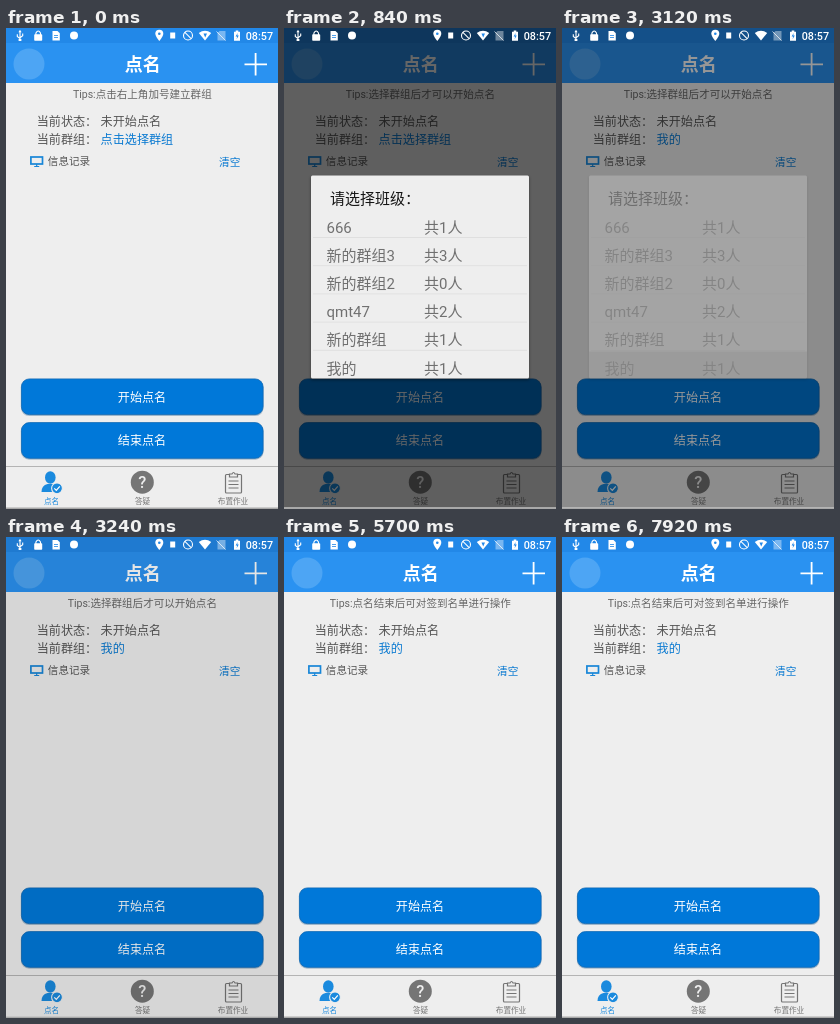
An HTML page for the animation above (8 s loop, 272 by 481 pixels).

```html
<!DOCTYPE html>
<html lang="zh-CN">
<head>
<meta charset="utf-8">
<title>点名</title>
<style>
html, body { margin: 0; width: 100%; height: 100%; overflow: hidden; background: #eee; }
svg { display: block; width: 100vw; height: 100vh; }
text { font-family: Roboto, "Noto Sans CJK SC", "Noto Sans CJK", sans-serif; white-space: pre; }
</style>
</head>
<body>
<svg viewBox="0 0 272 481" preserveAspectRatio="none">
  <defs>
    <filter id="soft" x="-10%" y="-10%" width="120%" height="120%"><feGaussianBlur stdDeviation="1.6"/></filter>
    <g id="button">
      <rect x="15" y="1.5" width="242.5" height="36.5" rx="8" fill="#a9bccd"/>
      <rect x="15.4" y=".9" width="241.700" height="35.700" rx="8" fill="#0078d9" stroke="#1069b4" stroke-width=".8"/>
    </g>
  </defs>

  <rect width="272" height="481" fill="#eee"/>
  <rect width="272" height="55" fill="#2a92f1"/>
  <rect width="272" height="15" fill="#2288e8"/>
  <circle cx="23" cy="36" r="15.5" fill="#4da5f4"/>
  <path d="M238.500 36.300h22.500M249.600 25v22.500" stroke="#fff" stroke-width="1.800"/>

  <g fill="none" stroke="#1886d8" stroke-width="1.700">
    <rect x="24.900" y="129" width="11.600" height="7"/>
    <path d="M30.700 136v2.500M28.200 138.500h5" stroke-width="1.200"/>
  </g>

  <use href="#button" y="350"/>
  <use href="#button" y="393.700"/>

  <path d="M0 438.500h272" stroke="#b4b4b4"/>
  <g fill="#1a8ade">
    <ellipse cx="44.300" cy="449.500" rx="5.300" ry="6.200"/>
    <path d="M35.500 464q0-6.500 6-8h5.500q5 1.500 6 8z"/>
    <circle cx="51" cy="460.300" r="5.400" stroke="#eee" stroke-width="1.100"/>
    <path d="M48.300 460.400l2 2 3.500-4" fill="none" stroke="#fff" stroke-width="1.200"/>
  </g>
  <circle cx="136.300" cy="454.200" r="11.500" fill="#757575"/>
  <g fill="none" stroke="#757575" stroke-width="1.200">
    <rect x="219.500" y="446.500" width="16" height="18.500" rx="1"/>
    <path d="M223.500 449v-3h2.500q1.500-3 3 0h2.500v3z" fill="#eee"/>
    <path d="M222.500 453h10M222.500 456.500h10M222.500 460h10"/>
  </g>
  <g id="page"></g>

  <rect id="dim" width="272" height="479.500" opacity="0"/>
  <rect y="479.500" width="272" height="1.500" fill="#a9a9a9"/>

  <g id="dialog" opacity="0">
    <rect x="27" y="149" width="218" height="203" fill="#000" opacity=".4" filter="url(#soft)"/>
    <rect x="27" y="147.500" width="218" height="203" rx="1.500" fill="#eee"/>
    <rect id="press" x="27" y="323.500" width="218" height="27" opacity="0"/>
    <g id="rows"></g>
  </g>

  <g id="status" fill="#fff" stroke="#fff" stroke-width="0">
    <g fill="none" stroke-width="1.100">
      <path d="M14 4v8M11.300 6.300v2.200l2.700 2M16.700 5.500v2.200l-2.700 2"/>
      <path d="M29.900 7V5q2.300-4 4.600 0V7"/>
      <circle cx="182" cy="7.500" r="4.500"/>
      <path d="M178.900 4.400l6.200 6.200"/>
    </g>
    <path d="M14 1.800l1.600 2.500h-3.200zM12.600 11h2.800v2h-2.800z"/>
    <rect x="28.200" y="6.300" width="8" height="6.500" rx=".8"/>
    <path d="M46.500 3h5l2.300 2.200V12.500h-7.300z"/>
    <path d="M48 7.500h4M48 9.500h4" stroke="#2288e8" stroke-width=".8"/>
    <circle cx="68" cy="7.500" r="4"/>
    <path d="M153.300 13q-4-5-4-7.300a4 4 0 0 1 8 0q0 2.300-4 7.300z"/>
    <circle cx="153.300" cy="5.700" r="1.300" fill="#2288e8"/>
    <rect x="164.200" y="4.500" width="5" height="6"/>
    <path d="M192.800 5q6.200-4.600 12.400 0l-6.200 7.600z"/>
    <path id="mark" d="M197.500 5.500h3.500l-1.800 4z" fill="#2288e8"/>
    <path d="M213.500 3h6v9.500h-8v-7.500z" opacity=".4"/>
    <path d="M210.500 3.500l9 9" stroke-width="1" opacity=".7"/>
    <path d="M229.700 2.500h2.600v1.200h1.700v9h-6v-9h1.700z"/>
    <path d="M231.600 5l-2 3.600h1.500l-.5 2.700 2.200-3.700h-1.500z" fill="#2288e8"/>
  </g>
</svg>

<script>
const LOOP = 8000;
const $ = id => document.getElementById(id);

// y is the optical middle of the line
function label(parent, str, x, y, size, fill, anchor = 'start', weight = 400) {
  const el = document.createElementNS('http://www.w3.org/2000/svg', 'text');
  const attrs = { x, y: y + size * 0.375, fill, 'font-size': size, 'text-anchor': anchor, 'font-weight': weight };
  for (const key in attrs) el.setAttribute(key, attrs[key]);
  el.textContent = str;
  $(parent).append(el);
  return el;
}

const BLUE = '#0b7ad1', GREY = '#555';
label('page', '点名', 136.7, 36.3, 18, '#fff', 'middle', 700);
const tip = label('page', '', 136.3, 66.3, 10.55, '#666', 'middle');
label('page', '当前状态：', 30.7, 93, 12.1, GREY);
label('page', '未开始点名', 94.6, 93, 12.1, GREY);
label('page', '当前群组：', 30.7, 111.3, 12.1, GREY);
const group = label('page', '', 94.6, 111.3, 12.1, BLUE);
label('page', '信息记录', 41.8, 133.5, 10.6, GREY);
label('page', '清空', 213, 133.5, 10.7, BLUE, 'start', 500);
label('page', '开始点名', 136, 369.3, 12.1, '#fff', 'middle', 500);
label('page', '结束点名', 136, 412.8, 12.1, '#fff', 'middle', 500);
label('page', '?', 136.3, 454.2, 16.5, '#eee', 'middle', 500);
label('page', '点名', 45.5, 473, 7.6, '#1a8ade', 'middle', 500);
label('page', '答疑', 136.5, 473, 7.6, '#777', 'middle');
label('page', '布置作业', 227, 473, 7.6, '#777', 'middle');
label('status', '08:57', 239.7, 8, 10.8, '#fff', 'start', 500);

label('rows', '请选择班级：', 46, 170.5, 15, '#151515');
[['666', 1], ['新的群组3', 3], ['新的群组2', 0], ['qmt47', 2], ['新的群组', 1], ['我的', 1]]
  .forEach(([name, count], i) => {
    const y = 199 + i * 28.2;
    label('rows', name, 42.5, y, 15, '#707070');
    label('rows', `共${count}人`, 140, y, 15, '#707070');
    if (i < 5) $('rows').insertAdjacentHTML('beforeend',
      `<path d="M29 ${y + 10.5}h214" stroke="#dcdcdc" stroke-width=".8"/>`);
  });

// [start ms, value], each held until the next
const tips = [
  [0, 'Tips:点击右上角加号建立群组'],
  [300, 'Tips:选择群组后才可以开始点名'],
  [5700, 'Tips:点名结束后可对签到名单进行操作']
];
const groups = [[0, '点击选择群组'], [3000, '我的']];
const marks = [[0, 1], [2580, 0], [3480, 1]];
const presses = [[0, 0], [2940, .15], [3300, 0]];
const dims = [[0, 0], [600, .1], [660, .3], [720, .46], [780, .56], [840, .6],
  [3000, .57], [3060, .49], [3120, .41], [3180, .25], [3240, .1], [3300, 0]];
const fades = [[0, 0], [600, .2], [660, .55], [720, .85], [780, 1],
  [3000, .8], [3060, .5], [3120, .25], [3180, .08], [3240, 0]];

const at = (steps, t) => steps.findLast(([start]) => start <= t)[1];
const setText = (el, str) => { if (el.textContent !== str) el.textContent = str; };
const setOpacity = (id, value) => $(id).setAttribute('opacity', value);

function draw(now) {
  const t = now % LOOP;
  setText(tip, at(tips, t));
  setText(group, at(groups, t));
  setOpacity('mark', at(marks, t));
  setOpacity('press', at(presses, t));
  setOpacity('dim', at(dims, t));
  setOpacity('dialog', at(fades, t));
}

const begin = performance.now();
function tick() {
  draw(performance.now() - begin);
  requestAnimationFrame(tick);
}
tick();
</script>
</body>
</html>
```
